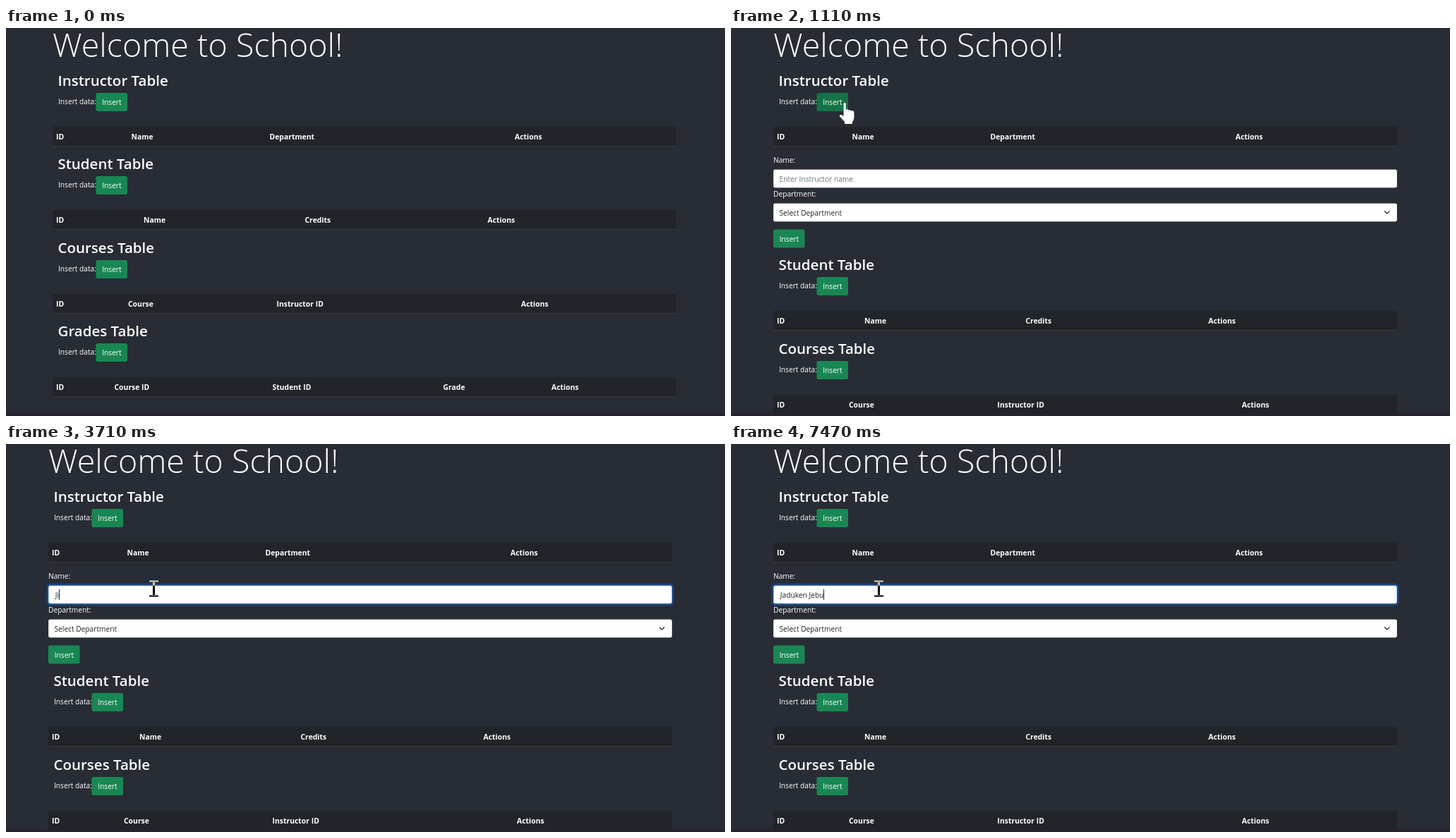
An HTML page with a canvas for the animation above (8 s loop, 1019 by 550 pixels).

```html
<!DOCTYPE html>
<html lang="en">
<head>
<meta charset="utf-8">
<title>School tables</title>
<style>
  html, body { margin: 0; width: 100%; height: 100%; overflow: hidden; background: #282c34; }
  canvas { display: block; }
</style>
</head>
<body>
<canvas id="stage" width="1019" height="550"></canvas>
<script>
const ctx = document.getElementById('stage').getContext('2d');
const LOOP = 8000, OPENED = 1110, FORM_HEIGHT = 143;
const BODY = 10.2, WIDTH = 884;
const GREEN = [25, 135, 84], GREEN_DARK = [21, 115, 71];

// Each table: title, top, then column label and offset pairs
const tables = [
  ['Instructor Table', 0, { ID: 5, Name: 111.5, Department: 307.5, Actions: 655 }],
  ['Student Table', 118, { ID: 5, Name: 129, Credits: 357.5, Actions: 616.5 }],
  ['Courses Table', 237, { ID: 5, Course: 107, 'Instructor ID': 317.5, Actions: 664 }],
  ['Grades Table', 355, { ID: 5, 'Course ID': 87.5, 'Student ID': 311.5, Grade: 553.5, Actions: 707 }]
];

// Pointer hot spot: time, x, y
const path = [
  [60, 946, 550], [800, 161, 105], [1180, 161, 105],
  [1700, 199.5, 212.5], [1970, 199.5, 212.5], [2050, 209.5, 205]
];
const clicks = [[900, 1110], [1780, 1960]];

const NAME = 'Jaduken Jebu';
const typing = [
  [0, ''], [2980, 'J'], [3250, 'Jiw'], [3710, 'Ji'], [3800, 'J'],
  ...[5430, 5540, 5650, 5790, 6120, 6520, 6800, 7070, 7270, 7370, 7470]
    .map((time, i) => [time, NAME.slice(0, i + 2)])
];
const caretOff = [[2450, 2980], [4310, 4800]];

const clamp = v => Math.max(0, Math.min(1, v));
const within = (t, spans) => spans.some(([a, b]) => t >= a && t < b);
const mix = (a, b, k) => `rgb(${a.map((v, i) => Math.round(v + (b[i] - v) * k))})`;

function text(str, x, y, { size = BODY, weight = 400, color = '#fff' } = {}) {
  ctx.font = `${weight} ${size}px "Open Sans", "Noto Sans", sans-serif`;
  ctx.fillStyle = color;
  ctx.fillText(str, x, y);
}

function box(x, y, w, h, fill, radius = 2.7) {
  ctx.beginPath();
  ctx.roundRect(x, y, w, h, radius);
  ctx.fillStyle = fill;
  ctx.fill();
}

function ring(x, y, w, h, color) {
  ctx.beginPath();
  ctx.roundRect(x - 1.35, y - 1.35, w + 2.7, h + 2.7, 4);
  ctx.lineWidth = 2.7;
  ctx.strokeStyle = color;
  ctx.stroke();
}

function button(x, y, fill = mix(GREEN, GREEN, 0)) {
  box(x, y, 44.5, 26, fill);
  text('Insert', x + 8.7, y + 17);
}

function table([title, top, columns], left, y, fill) {
  y += top;
  text(title, left + 7.5, y + 82, { size: 20.5, weight: 600 });
  text('Insert data:', left + 8, y + 108);
  button(left + 61.5, y + 92, fill);
  box(left, y + 140, WIDTH, 27, '#212529', 0);
  box(left, y + 167, WIDTH, 1, '#373b3e', 0);
  for (const label in columns)
    text(label, left + columns[label], y + 158, { size: 10.4, weight: 700 });
}

function field(y, focus) {
  if (focus) ring(60, y, WIDTH, 26, `rgba(13,110,253,${0.35 * focus})`);
  box(60, y, WIDTH, 26, mix([206, 212, 218], [134, 183, 254], focus));
  box(60.7, y + 0.7, WIDTH - 1.4, 24.6, '#fff', 2);
}

function form(t, focus) {
  text('Name:', 60, 191);
  field(200.5, focus);
  const typed = typing.findLast(([time]) => t >= time)[1];
  if (typed) text(typed, 69.8, 218, { color: '#212529' });
  else text('Enter Instructor name', 68.5, 218, { color: '#6c757d' });
  if (focus && !within(t, caretOff)) {
    const x = typed ? 69.8 + ctx.measureText(typed).width : 69;
    box(Math.round(x), 206, 1, 15, '#212529', 0);
  }

  text('Department:', 60, 239);
  field(248.5, 0);
  text('Select Department', 68.5, 265.5, { color: '#212529' });
  ctx.beginPath();
  ctx.moveTo(926, 259.5);
  ctx.lineTo(929.6, 263.1);
  ctx.lineTo(933.2, 259.5);
  ctx.lineWidth = 1.4;
  ctx.strokeStyle = '#343a40';
  ctx.stroke();
  button(60, 285.5);
}

function pointerAt(t) {
  const i = path.findLastIndex(([time]) => t >= time);
  if (i < 0) return null;
  const [t0, x0, y0] = path[i], [t1, x1, y1] = path[i + 1] || [LOOP, x0, y0];
  const p = clamp((t - t0) / (t1 - t0)), k = p * p * (3 - 2 * p);
  return [x0 + (x1 - x0) * k, y0 + (y1 - y0) * k];
}

const arrow = new Path2D('M0 0V24L5.5 19L9 27L12.5 25.5L9 17.5H17Z');
const hand = new Path2D(
  'M-1.5 2Q0 -.5 1.8 2V11Q4 9 5.3 11.5Q8 10 9 12.5Q12.5 11 13.5 14.5V22' +
  'Q13 26 11 28V31H0V28L-7 20.5Q-8 17.5 -4.5 18L-1.5 20Z');

function drawPointer(x, y, kind) {
  ctx.save();
  ctx.translate(x, y);
  if (kind === 'beam') {
    // The text pointer inverts what lies beneath it
    ctx.globalCompositeOperation = 'difference';
    box(-1.5, -9.5, 3, 19, '#fff', 0);
    box(-6.5, -11.5, 13, 2, '#fff', 0);
    box(-6.5, 9.5, 13, 2, '#fff', 0);
  } else {
    const shape = kind === 'hand' ? hand : arrow;
    ctx.lineWidth = 1;
    ctx.strokeStyle = '#15181c';
    ctx.stroke(shape);
    ctx.fillStyle = '#fff';
    ctx.fill(shape);
  }
  ctx.restore();
}

function draw(t) {
  const open = t >= OPENED, left = open ? 60 : 66;
  const focus = clamp((t - 1930) / 120);
  const pointer = pointerAt(t);
  const over = (x, y, w, h) => pointer &&
    pointer[0] >= x && pointer[0] <= x + w && pointer[1] >= y && pointer[1] <= y + h;
  const onButton = over(left + 61.5, 92, 44.5, 26);
  const onField = open && over(60, 200.5, WIDTH, 26);

  box(0, 0, 1019, 550, '#282c34', 0);
  text('Welcome to School!', left, 41, { size: 46.6, weight: 300 });

  const ringAlpha = 0.5 * clamp((t - OPENED) / 150) * (1 - focus);
  if (ringAlpha) ring(left + 61.5, 92, 44.5, 26, `rgba(60,153,110,${ringAlpha})`);
  const shade = open ? 1 - focus : onButton ? 1 : 0;
  tables.forEach((entry, i) => table(entry, left, open && i ? FORM_HEIGHT : 0,
    i ? undefined : mix(GREEN, GREEN_DARK, shade)));
  if (open) form(t, focus);
  box(0, 546, 1019, 4, '#25232d', 0);

  if (!pointer) return;
  const [x, y] = pointer;
  if (within(t, clicks)) box(x - 20, y - 20, 40, 40, 'rgba(255,245,0,.5)', 20);
  drawPointer(x, y, onButton ? 'hand' : onField ? 'beam' : 'arrow');
}

const start = performance.now();
function tick() {
  draw((performance.now() - start) % LOOP);
  requestAnimationFrame(tick);
}
tick();
</script>
</body>
</html>
```
